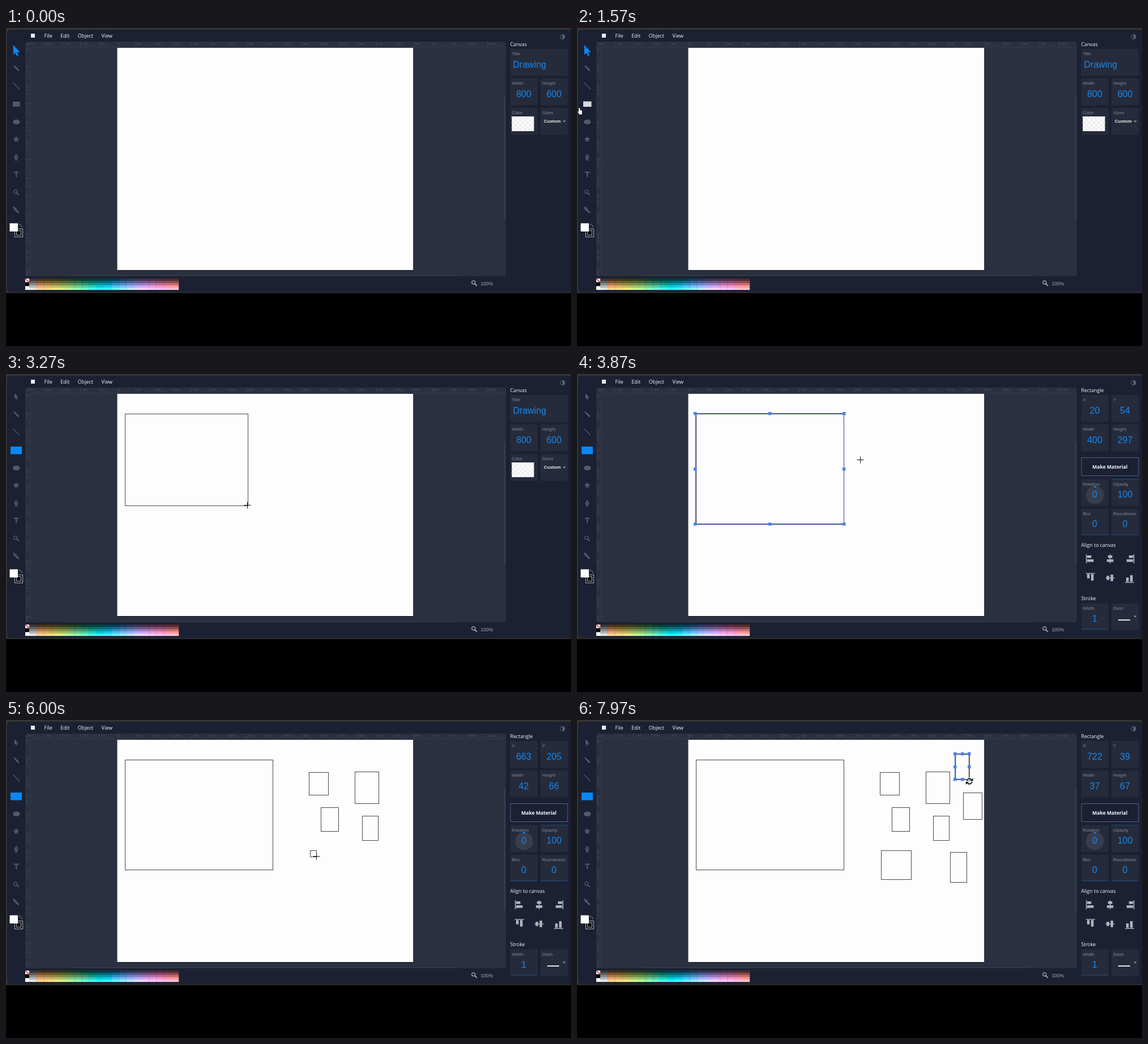
Recreate the animation shown at these times as an HTML page with a canvas. Size 998 by 561 pixels, loop 8 s.

```html
<!DOCTYPE html>
<html lang="en">
<head>
<meta charset="utf-8">
<title>Drawing editor</title>
<style>
html, body { margin: 0; width: 100%; height: 100%; overflow: hidden; background: #000; }
canvas { display: block; width: 998px; height: 561px; }
</style>
</head>
<body>
<canvas id="stage" width="998" height="561"></canvas>
<script>
const g = document.getElementById('stage').getContext('2d');
const LOOP = 8000, TAU = Math.PI * 2;
const ARIAL = '"Liberation Sans", Arial, sans-serif';
const UI = '"Open Sans", "Noto Sans", sans-serif';
const BLUE = '#1488f0', GRIP = '#4f80e8', ICON = '#555a69', ALIGN = '#b2b4bc', DIM = '#174a7c';
const BG = '#1b2133', WORK = '#2a3040', CARD = '#262b3b', PAPER = '#fdfdfd';
const SCALE = 0.653, LEFT = 196.5, TOP = 35;
const px = u => LEFT + u * SCALE, py = u => TOP + u * SCALE;

// A rectangle in document units; larger ones take longer to drag out.
function shape(x, y, w, h, up) {
  const down = up - 170 - 1.27 * Math.hypot(w, h);
  return { x, y, w, h, down, up, x0: px(x), y0: py(y), x1: px(x + w), y1: py(y + h) };
}

const shapes = [
  shape(20, 54, 400, 297, 3480),
  shape(518, 87, 52, 62, 4560),
  shape(643, 85, 63, 87, 5080),
  shape(550, 182, 48, 64, 5460),
  shape(663, 205, 42, 66, 5770),
  shape(522, 299, 80, 77, 6220),
  shape(708, 303, 45, 82, 6850),
  shape(743, 143, 51, 71, 7340),
  shape(722, 39, 37, 67, 7900)
];

const ENTER = 1450, HOVER = 1500, PICK = 1930;
const path = [[ENTER, -6, 143], [1570, 4, 141], [1860, 17, 135], [2000, 18, 135],
  [2540, 211, 71], [3870, 500, 152]];
for (const s of shapes)
  path.push([s.down, s.x0, s.y0], [s.up, s.x1, s.y1], [s.up + 45, s.x1 + 1, s.y1 + 4]);
path.sort((a, b) => a[0] - b[0]);

function pointer(t) {
  const i = path.findIndex(p => p[0] > t);
  if (i < 1) return path.at(i).slice(1);
  const [t0, x0, y0] = path[i - 1], [t1, x1, y1] = path[i];
  const k = (t - t0) / (t1 - t0), e = k * k * (3 - 2 * k);
  return [x0 + (x1 - x0) * e, y0 + (y1 - y0) * e];
}

function box(x, y, w, h, color) {
  g.fillStyle = color;
  g.fillRect(x, y, w, h);
}

function round(x, y, w, h, r, color) {
  g.beginPath();
  g.roundRect(x, y, w, h, r);
  g.fillStyle = color;
  g.fill();
}

function disc(x, y, rx, ry, color) {
  g.beginPath();
  g.ellipse(x, y, rx, ry, 0, 0, TAU);
  g.fillStyle = color;
  g.fill();
}

function arc(x, y, r, from, to, color, width) {
  g.beginPath();
  g.arc(x, y, r, from, to);
  g.strokeStyle = color;
  g.lineWidth = width;
  g.stroke();
}

function poly(points, color, x = 0, y = 0, s = 1) {
  g.beginPath();
  for (let i = 0; i < points.length; i += 2) g.lineTo(x + points[i] * s, y + points[i + 1] * s);
  g.closePath();
  g.fillStyle = color;
  g.fill();
}

function line(x0, y0, x1, y1, color, width = 1) {
  g.beginPath();
  g.moveTo(x0, y0);
  g.lineTo(x1, y1);
  g.strokeStyle = color;
  g.lineWidth = width;
  g.stroke();
}

function text(str, x, y, font, color, align = 'left') {
  g.font = font;
  g.fillStyle = color;
  g.textAlign = align;
  g.fillText(str, x, y);
}

const caret = (x, y) => poly([-3, -1.5, 3, -1.5, 0, 1.5], '#8c909b', x, y);

function frame() {
  box(0, 0, 998, 561, '#000');
  box(0, 0, 998, 467.5, '#363532');
  round(2, 3, 1000, 463, 5, BG);
  round(34, 24, 849, 414, 4, WORK);
  box(113, 436, 685, 1.5, '#343b40');
  box(880, 120, 2, 216, '#363e4b');
  box(197, 427, 522, 1, '#11141c');
  box(LEFT, TOP, 522.6, 392, PAPER);

  box(44, 10, 7, 7, '#e8eaf0');
  let x = 67.5;
  for (const s of ['File', 'Edit', 'Object', 'View']) {
    text(s, x, 17, '500 9px ' + UI, '#f4f5f8');
    x += g.measureText(s).width + 14.5;
  }
  arc(983, 15.5, 4, 0, TAU, '#626672', 1);
  arc(983, 15.5, 2, -TAU / 4, TAU / 4, '#626672', 4);
}

function rulers() {
  const ink = '#4b5163', font = '6px ' + ARIAL;
  const len = u => u % 50 === 0 ? 11 : u % 25 === 0 ? 5 : 2.5;
  g.save();
  g.beginPath();
  g.rect(34, 24, 848, 413);
  g.clip();
  g.beginPath();
  for (let u = -230; u <= 1050; u += 5) {
    const x = Math.round(px(u)) + 0.5;
    g.moveTo(x, 35 - len(u));
    g.lineTo(x, 34.5);
  }
  for (let u = 0; u <= 615; u += 5) {
    const y = Math.round(py(u)) + 0.5;
    g.moveTo(44.5 - len(u), y);
    g.lineTo(44, y);
  }
  g.strokeStyle = '#454b5c';
  g.lineWidth = 0.7;
  g.stroke();
  for (let u = -250; u <= 1000; u += 50) text(String(u), px(u) + 2.5, 29.5, font, ink);
  for (let u = 0; u <= 600; u += 50)
    [...String(u)].forEach((d, i) => text(d, 35.5, py(u) + 6 + i * 5.6, font, ink));
  g.restore();
}

function magnifier(x, y, color) {
  arc(x - 1.2, y - 1.2, 3, 0, TAU, color, 1.3);
  line(x + 1, y + 1, x + 4.8, y + 4.8, color, 1.8);
}

function star(x, y) {
  const points = [];
  for (let i = 0; i < 10; i++) {
    const r = i % 2 ? 2.6 : 6.2, a = i * TAU / 10 - TAU / 4;
    points.push(r * Math.cos(a), r * Math.sin(a));
  }
  poly(points, ICON, x, y);
}

function tools(t) {
  const picked = t >= PICK;
  const arrow = [-3, -5.5, -3, 4.5, -0.8, 2.6, 0.8, 6, 2.3, 5.3, 0.8, 2, 3.8, 1.8];
  poly(arrow, picked ? ICON : '#0b87f4', 18, 39.5, picked ? 1 : 1.72);
  poly([-5, -4, -3, -5, 5, 2.5, 5, 5, 2.5, 4.2], ICON, 18, 71);
  line(12.5, 96.5, 24, 108, ICON, 1.3);
  if (picked) box(8, 128, 20, 13.5, '#0b87f4');
  else if (t >= HOVER) box(11, 129.5, 14.5, 9.5, '#d8dade');
  else box(12, 130, 12.5, 8.5, ICON);
  disc(18.3, 165.8, 6.3, 4.3, ICON);
  star(18, 196.4);

  poly([0, -6.5, 3.6, 0, 2, 3.4, -2, 3.4, -3.6, 0], ICON, 18, 227.5);
  line(18, 221.5, 18, 227, BG, 0.8);
  disc(18, 228, 1, 1, BG);
  box(15.6, 231.5, 4.8, 2, ICON);
  box(13.7, 253.5, 9, 2, ICON);
  box(17.2, 253.5, 2, 9.5, ICON);
  magnifier(18, 290, ICON);
  line(15.5, 319, 22.5, 326, ICON, 2.8);
  line(14.4, 322, 18.6, 317.8, ICON, 1.5);
  disc(14.3, 317.3, 2, 2, ICON);

  ['#b4b6bb', '#0a0c12', '#b4b6bb', '#0a0c12']
    .forEach((c, i) => {
      const inset = i + (i > 1 ? 1 : 0);
      box(15 + inset, 354 + inset, 15 - 2 * inset, 15 - 2 * inset, c);
    });
  box(6, 344, 15.5, 15.5, '#11141c');
  box(6.5, 344.5, 14.5, 14.5, PAPER);
  arc(24, 350, 3.6, -TAU / 4, 0, ICON, 1.2);
  poly([-2.2, -1.2, 2.2, -1.2, 0, 1.3], ICON, 27.8, 350.7);
  poly([1.2, -2, 1.2, 2, -1.3, 0], ICON, 23.3, 346.6);
}

function palette() {
  ['#fff', '#000', '#fff'].forEach((c, i) => box(34, 442 + i * 6.67, 7, 6.67, c));
  line(34.3, 442.3, 40.7, 448.4, '#d81e2c', 1.5);
  // Rows get lighter downwards, columns walk once round the hue circle.
  for (let c = 0; c < 20; c++)
    for (let r = 0; r < 5; r++) {
      const light = 23 + 17 * r, chroma = c ? 23 + 7 * r : 0, hue = 60 + 18 * (c - 1);
      box(41 + c * 13.2, 442 + r * 4, 13.4, 4.1, `lch(${light}% ${chroma} ${hue})`);
    }
  magnifier(827, 450, '#a6a9b3');
  text('100%', 838.5, 453.5, '8.5px ' + ARIAL, '#a6a9b3');
}

const head = (s, y) => text(s, 890.5, y, '500 8.8px ' + UI, '#f4f5f8');
const value = (s, x, y) => text(String(s), x, y, '16px ' + ARIAL, BLUE, 'center');
const column = i => i ? 944 : 890.5;

function card(col, y, label, content, width = 48.5) {
  const x = column(col);
  round(x, y, width, 47.5, 2, CARD);
  text(label, x + 3, y + 11, '8px ' + ARIAL, '#858994');
  if (content !== undefined) value(content, x + 24, y + 32.5);
}

const meter = (col, y) => box(column(col), y, 48.5, 1, DIM);

function canvasPanel() {
  head('Canvas', 32);
  card(0, 37, 'Title', undefined, 102);
  text('Drawing', 895.5, 69.5, '16px ' + ARIAL, BLUE);
  card(0, 89, 'Width', 800);
  card(1, 89, 'Height', 600);
  card(0, 141, 'Color');
  card(1, 141, 'Sizes');
  box(893.5, 156, 39, 26, PAPER);
  for (let r = 0; r < 6; r++)
    for (let c = r % 2; c < 9; c += 2) box(893.5 + c * 4.33, 156 + r * 4.33, 4.33, 4.33, '#f0edf0');
  text('Custom', 950, 166.5, 'bold 8px ' + ARIAL, '#f0f1f4');
  caret(986, 165);
}

// One guide bar with a short and a long block; k slides both from start to end.
function alignIcon(k) {
  box(-0.7, 0, 1.4, 16, ALIGN);
  [7.5, 11.5].forEach((len, i) => box(1.3 * (1 - 2 * k) - len * k, 2 + 7 * i, len, 4.5, ALIGN));
}

function alignIcons() {
  for (const k of [0, 0.5, 1]) {
    g.setTransform(1, 0, 0, 1, 899.7 + 84 * k, 318);
    alignIcon(k);
    g.setTransform(0, 1, 1, 0, 899 + 69 * k, 351.7 + 16 * k);
    alignIcon(k);
  }
  g.resetTransform();
}

function shapePanel(s) {
  head('Rectangle', 32);
  card(0, 37, 'X', s.x);
  card(1, 37, 'Y', s.y);
  card(0, 89, 'Width', s.w);
  card(1, 89, 'Height', s.h);
  round(890.5, 147, 102, 33, 2, '#535d87');
  round(891.5, 148, 100, 31, 2, BG);
  text('Make Material', 941.3, 166.8, 'bold 8.6px ' + UI, '#f6f7fa', 'center');
  card(0, 185.5, 'Rotation');
  disc(915, 213.5, 16, 16, '#383d4d');
  box(913, 198, 4, 2, BLUE);
  value(0, 914.5, 218);
  card(1, 185.5, 'Opacity', 100);
  meter(1, 185);
  card(0, 237.5, 'Blur', 0);
  card(1, 237.5, 'Roundness', 0);
  meter(0, 283);
  meter(1, 283);
  head('Align to canvas', 305);
  alignIcons();
  head('Stroke', 399);
  card(0, 404.5, 'Width', 1);
  card(1, 404.5, 'Dash');
  meter(0, 449.5);
  box(956, 433, 21, 2, '#e6e7ea');
  caret(986, 428);
}

function outline(x0, y0, x1, y1, color) {
  const [l, t, r, b] = [x0, y0, x1, y1].map(v => Math.round(v) + 0.5);
  g.strokeStyle = color;
  g.lineWidth = 1;
  g.strokeRect(l, t, r - l, b - t);
}

function grips(s) {
  const l = s.x0 - 0.6, t = s.y0 - 0.6, w = s.x1 - s.x0 + 1.2, h = s.y1 - s.y0 + 1.2;
  outline(l - 0.4, t - 0.4, l + w, t + h, GRIP);
  outline(s.x0, s.y0, s.x1, s.y1, 'rgba(30, 30, 50, 0.55)');
  for (let i = 0; i < 9; i++)
    if (i !== 4)
      box(Math.round(l + w * (i % 3) / 2 - 2.5), Math.round(t + h * Math.floor(i / 3) / 2 - 2.5), 5.5, 5.5, GRIP);
}

function cross(x, y) {
  x = Math.floor(x) + 0.5;
  y = Math.floor(y) + 0.5;
  line(x - 6, y, x + 6, y, '#111');
  line(x, y - 6, x, y + 6, '#111');
}

function hand(x, y) {
  g.beginPath();
  g.roundRect(x - 1, y, 2.2, 8, 1);
  g.roundRect(x - 1, y + 4, 5.8, 7.5, 1.5);
  g.moveTo(x - 3.6, y + 5.4);
  g.lineTo(x - 1, y + 7);
  g.lineTo(x, y + 11);
  g.closePath();
  g.strokeStyle = '#10131c';
  g.lineWidth = 1.4;
  g.stroke();
  g.fillStyle = '#fff';
  g.fill();
}

function spin(x, y) {
  for (const [color, rim] of [['#fff', 1], ['#111', 0]])
    for (const turn of [0, Math.PI]) {
      g.save();
      g.translate(x, y);
      g.rotate(turn);
      arc(0, 0, 4.6, -TAU * 0.475, -TAU / 8, color, 2 + 2 * rim);
      poly([1.2 - rim, -0.8 + rim, 6.4 + rim, -0.8 + rim, 6.4 + rim, -6 - rim], color);
      g.restore();
    }
}

function render(t) {
  frame();
  rulers();
  tools(t);
  palette();

  const [mx, my] = pointer(t);
  const done = shapes.filter(s => t >= s.up);
  const active = shapes.find(s => t >= s.down && t < s.up);
  const last = done.at(-1);

  done.forEach(s => outline(s.x0, s.y0, s.x1, s.y1, '#484848'));
  if (active) outline(active.x0, active.y0, mx, my, '#484848');
  else if (last) grips(last);

  if (last) shapePanel(last);
  else canvasPanel();

  if (t < ENTER) return;
  if (mx < 34) hand(mx, my);
  else if (!active && last && Math.hypot(mx - last.x1, my - last.y1) < 9) spin(mx, my);
  else cross(mx, my);
}

const start = performance.now();
function tick() {
  render((performance.now() - start) % LOOP);
  requestAnimationFrame(tick);
}
tick();
</script>
</body>
</html>
```
